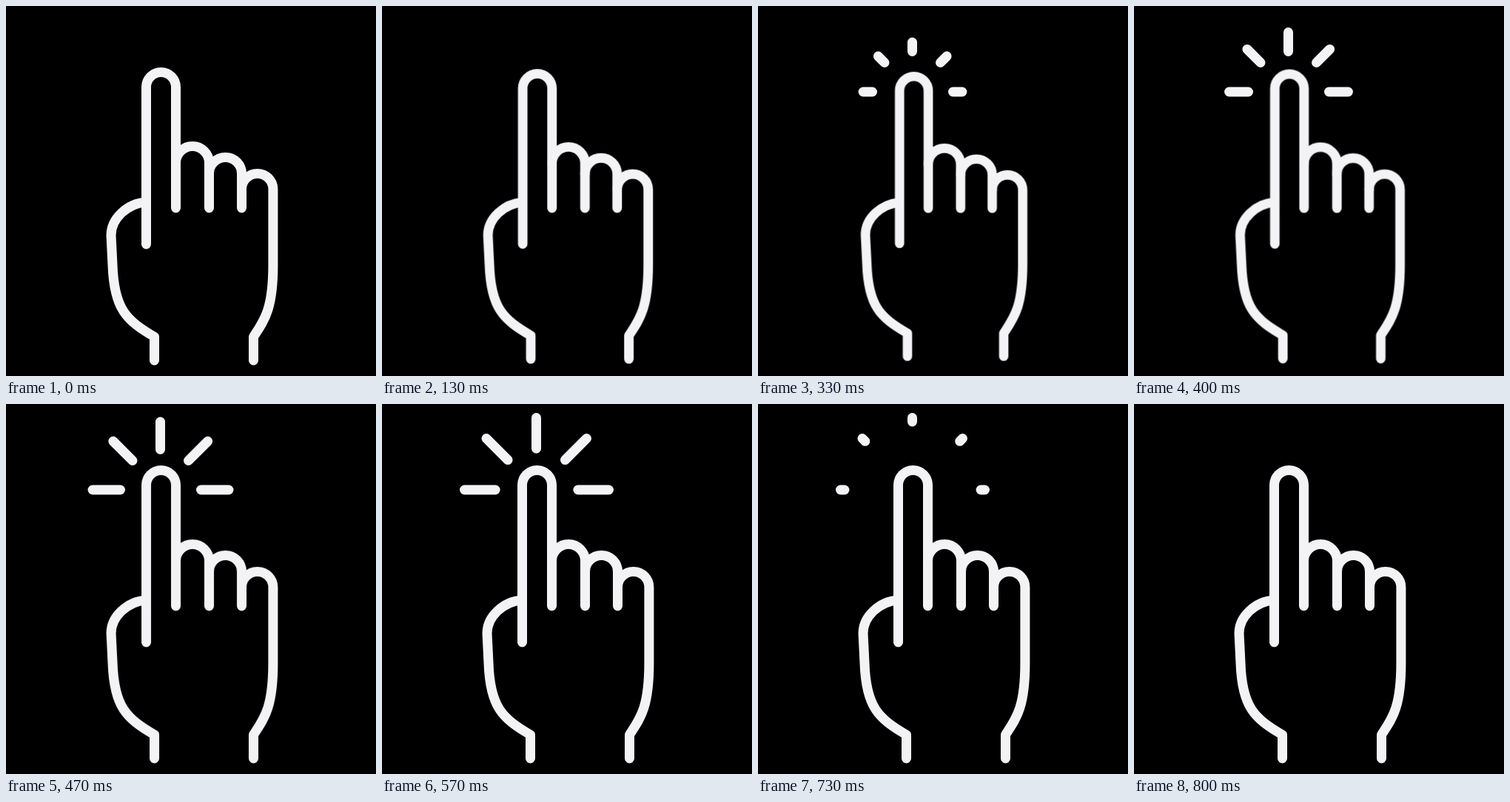
An HTML page without scripts that plays this animation: 500 by 500 pixels, repeating every 1200 ms.

```html
<!DOCTYPE html>
<html lang="en">
<head>
<meta charset="utf-8">
<title>Tap</title>
<style>
  html, body {
    margin: 0;
    width: 100%;
    height: 100%;
    overflow: hidden;
    background: #000;
  }
  svg {
    display: block;
    width: 100%;
    height: 100%;
    fill: none;
    stroke: #f3f3f5;
    stroke-width: 13;
    stroke-linecap: round;
    stroke-linejoin: round;
  }
  .hand {
    transform-origin: 250px 284px;
    animation: press 1200ms infinite;
  }
  .rays {
    stroke-dasharray: 0 3;
    animation: burst 1200ms infinite, show 1200ms step-end infinite;
  }
  @keyframes press {
    0% { transform: scale(1); animation-timing-function: cubic-bezier(.6, 0, .4, 1); }
    25% { transform: scale(.97); animation-timing-function: cubic-bezier(.6, 0, .4, 1); }
    40.8%, 100% { transform: scale(1); }
  }
  /* Each ray grows outward, then its inner end follows. */
  @keyframes burst {
    0%, 22.22% {
      stroke-dasharray: 0 3;
      stroke-dashoffset: 0;
      animation-timing-function: cubic-bezier(.167, .167, .75, 1);
    }
    44.44%, 47.22% {
      stroke-dasharray: 1 3;
      stroke-dashoffset: 0;
      animation-timing-function: ease-out;
    }
    66.66%, 100% { stroke-dasharray: 0 3; stroke-dashoffset: -1; }
  }
  @keyframes show {
    0% { visibility: hidden; }
    24.5% { visibility: visible; }
    66.6%, 100% { visibility: hidden; }
  }
</style>
</head>
<body>
<svg viewBox="0 0 500 500">
  <g class="hand">
    <path d="M189.5 322V109.5a20 20 0 0 1 40 0V273"/>
    <path d="M229.5 212a22.5 22.5 0 0 1 45 0V273"/>
    <path d="M274.5 226.5a22 22 0 0 1 44 0V273"/>
    <path d="M318.5 247.7a21.2 21.2 0 0 1 42.4 0V350C360.9 410 349 425 334.5 447V479"/>
    <path d="M189 265C164 267 142 287 142 310L144 350C146 410 163 425 200.5 447V479"/>
  </g>
  <g class="rays">
    <path pathLength="1" d="M154.5 116H111.5"/>
    <path pathLength="1" d="M171 76.5L141 46.5"/>
    <path pathLength="1" d="M208.5 61.5V18.5"/>
    <path pathLength="1" d="M246.5 76.5L276.5 46.5"/>
    <path pathLength="1" d="M263.5 116H306.5"/>
  </g>
</svg>
</body>
</html>
```
